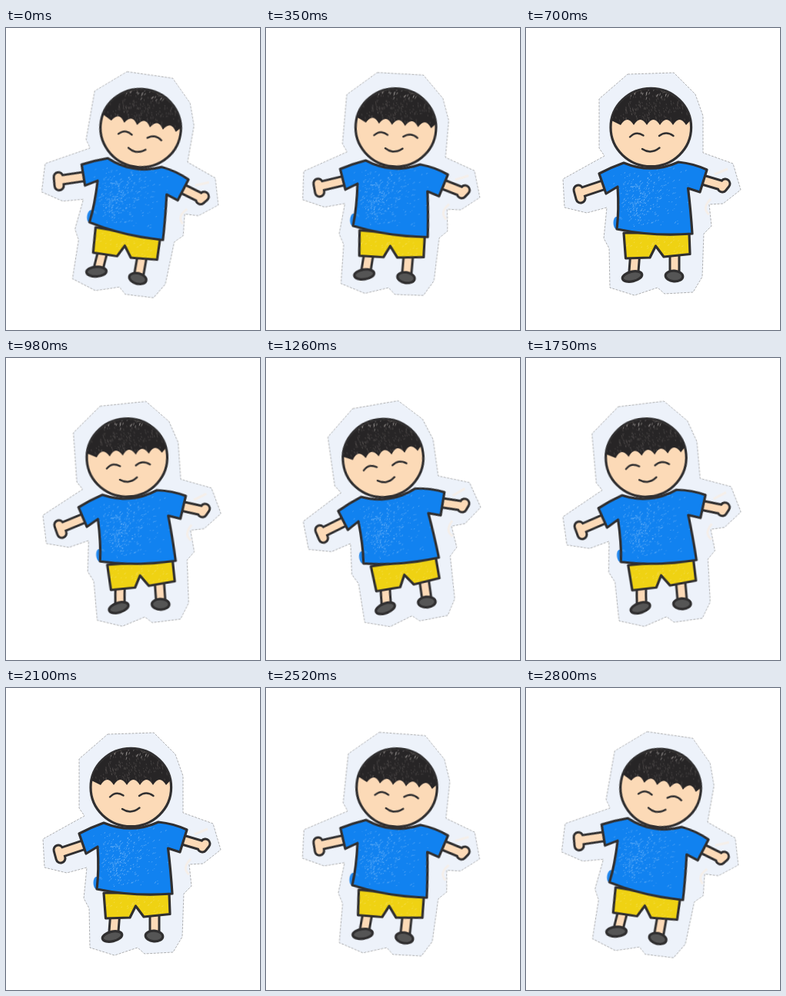
These frames come from a looping animation (330x392 px, 2870 ms). An HTML page:

```html
<!DOCTYPE html>
<html lang="en">
<head>
<meta charset="utf-8">
<title>Swaying paper boy</title>
<style>
  html, body { margin: 0; width: 100%; height: 100%; overflow: hidden; background: #fff; }
  svg { display: block; width: 100vw; height: 100vh; }
  #boy { transform-origin: 163.5px 202px; animation: sway 2870ms steps(20, end) infinite; }
  @keyframes sway {
    0% { transform: rotate(10deg); }
    48.78% { transform: rotate(-10deg); }
    97.56%, 100% { transform: rotate(10deg); }
  }
  .ink { stroke: #302f30; stroke-width: 3.2; stroke-linejoin: round; stroke-linecap: round; }
  .line { fill: none; }
  .skin { fill: #fcdab7; }
  .shirt { fill: #1182f0; }
  .shorts { fill: #efd213; }
  .shoe { fill: #555; }
  .limbs { fill: none; stroke-linecap: round; }
  .edge { stroke: #302f30; stroke-width: 15; }
  .flesh { stroke: #fcdab7; stroke-width: 9; }
</style>
</head>
<body>
<svg viewBox="0 0 330 392">
  <defs>
    <path id="limbs" d="M106 202 L73 213 M68 210 L71 221 M226 196 L253 204 M259 202 L255 207 M142 290 L140 316 M193 290 V316"/>
    <path id="shirt" d="M127 175 Q110 181 95 189 L104 215 L119 206 Q121 236 118 261 Q166 271 216 267 Q214 236 210.500 208 L226 213 L235 184 Q218 176 198 174 Q163 190 127 175Z"/>
    <path id="shorts" d="M127 266 L129.500 299 L161 298 L168.500 283 L179 297 L213 293.500 L212 266Z"/>
    <path id="hair" d="M111 120 L123 126 q8.500 -14 17 0 q8.500 -14 17 0 q8.500 -14 17 0 q8.500 -14 17 0 q8.500 -14 17 0 L213.500 120 A52.300 50.600 0 0 0 111 120Z"/>
    <clipPath id="shirtClip"><use href="#shirt"/></clipPath>
    <clipPath id="shortsClip"><use href="#shorts"/></clipPath>
    <clipPath id="hairClip"><use href="#hair"/></clipPath>
  </defs>

  <g id="boy">
    <path fill="#edf2fa" stroke="#666" stroke-width=".5" stroke-dasharray="3 1.500" d="M132 60 L192 58 L220 86 L230 114 V162 L269 176 L279 210 L256 228 L238 229 L241 257 L231 267 L229 323 L217 343 L180 345 L171 337 L141 347 L109 337 L108 286 L101 273 L105 233 L79 240 L50 233 L48 196 L102 166 L95 156 V92Z"/>
    <path d="M238 242 Q228 234 240 222 M245 190 L262 183" fill="none" stroke="#f5efea" stroke-width="3"/>
    <ellipse cx="117.500" cy="253" rx="4" ry="8" fill="#2188ef"/>

    <use href="#limbs" class="limbs edge"/>
    <use href="#limbs" class="limbs flesh"/>
    <g class="ink shoe">
      <ellipse cx="138" cy="322.500" rx="13" ry="6.300" transform="rotate(-13 138 322.500)"/>
      <ellipse cx="192.500" cy="322" rx="11.300" ry="6.800" transform="rotate(4 192.500 322)"/>
    </g>

    <use href="#shorts" class="shorts"/>
    <g id="shortsMarks" clip-path="url(#shortsClip)"/>
    <use href="#shorts" class="ink line"/>

    <use href="#shirt" class="shirt"/>
    <g id="shirtMarks" clip-path="url(#shirtClip)"/>
    <use href="#shirt" class="ink line"/>

    <ellipse class="ink skin" cx="162.300" cy="129" rx="52.300" ry="50.600"/>
    <use href="#hair" fill="#272526"/>
    <g id="hairMarks" clip-path="url(#hairClip)"/>

    <g class="ink line" style="stroke-width:2.400">
      <path d="M135 141.500 Q143 133 152.500 139.500"/>
      <path d="M173 140 Q182 133 191.500 140"/>
      <path d="M151 157 Q162 164.500 173.500 155.500"/>
    </g>
  </g>
</svg>
<script>
  let seed = 11;
  const rand = () => (seed = seed * 16807 % 2147483647) / 2147483647;
  const spread = (mid, size) => mid + (rand() + rand() - 1) * size;

  // Scatter short crayon strokes around a centre
  function scribble(id, count, color, [cx, cy, w, h], [dx, dy], width = 0.9) {
    let d = '';
    for (let i = 0; i < count; i++) {
      const k = 0.3 + rand();
      d += `M${spread(cx, w).toFixed(1)} ${spread(cy, h).toFixed(1)}l${(dx * k).toFixed(1)} ${(dy * k).toFixed(1)}`;
    }
    const path = document.createElementNS('http://www.w3.org/2000/svg', 'path');
    const attrs = { d, stroke: color, 'stroke-width': width, 'stroke-opacity': 0.5, fill: 'none' };
    for (const name in attrs) path.setAttribute(name, attrs[name]);
    document.getElementById(id).append(path);
  }

  scribble('shirtMarks', 220, '#a9d2fb', [160, 215, 54, 50], [1, -1.5]);
  scribble('shirtMarks', 130, '#c4e0fc', [145, 225, 24, 42], [0.8, -1.5]);
  scribble('shortsMarks', 60, '#f8e67c', [170, 281, 48, 20], [2, -1]);
  scribble('hairMarks', 170, '#77716e', [162, 106, 54, 24], [0.6, 3], 0.7);
  scribble('hairMarks', 24, '#d5d0cc', [162, 84, 40, 6], [-1, 3]);
</script>
</body>
</html>
```
